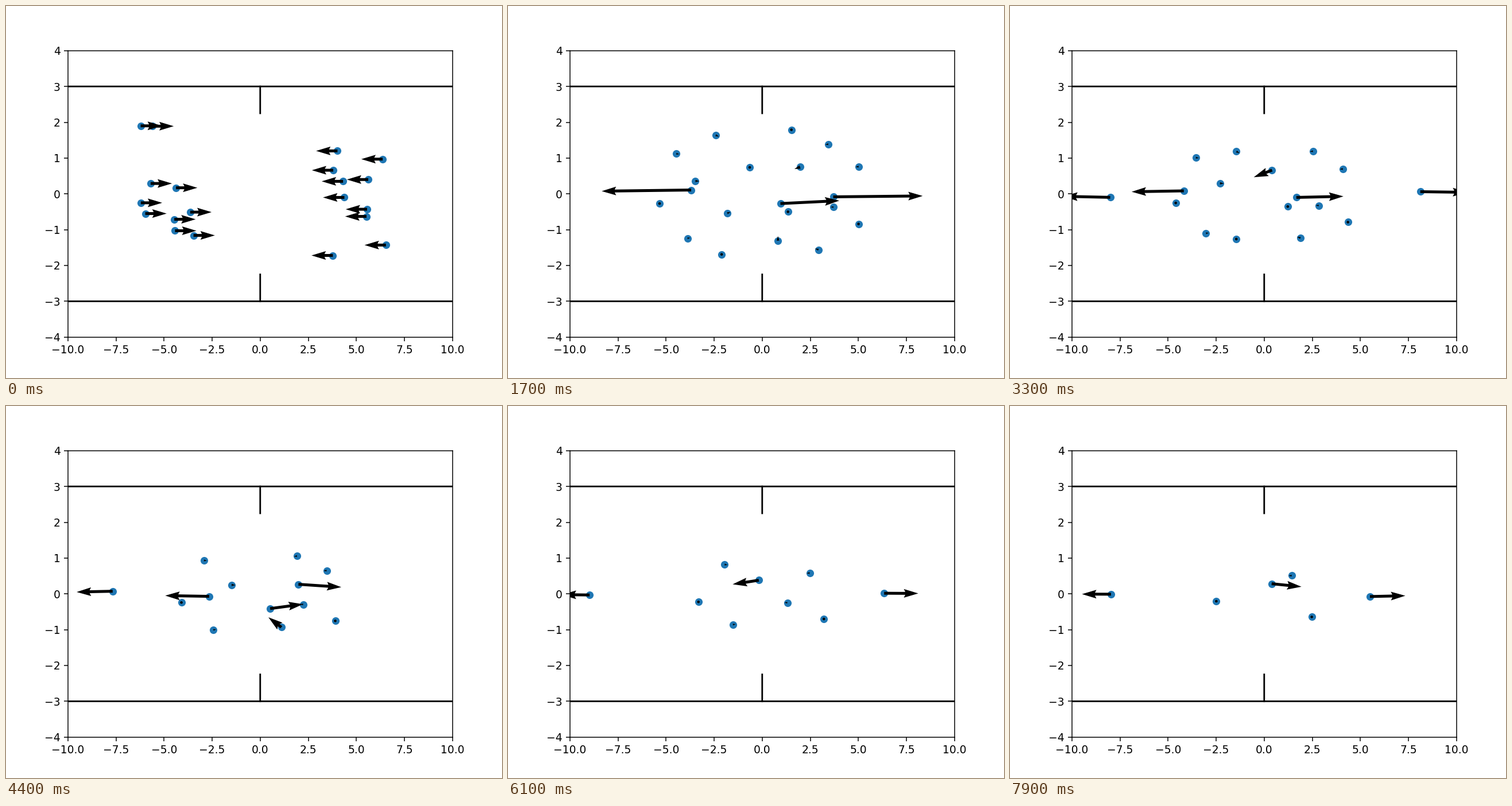
Animation of 864 by 648 pixels, one loop 8 s. Source, as a matplotlib script:

```python
import numpy as np
import matplotlib.pyplot as plt
from matplotlib.animation import FuncAnimation

FRAMES, STEP = 80, 0.1
SPEED = 4.0     # desired walking speed
BRAKE = 0.5     # time to slow down behind the crowd
QUEUE = 1.7     # time at which the queue has formed
REACH = 1.2     # distance from the door where the dash begins
GROW = 0.7      # time scale of speeding up before the door
FADE = 0.4      # time scale of the push behind the door
CENTRE = 0.5    # time scale of drifting to the middle line


def dash(t, push):
    """Distance past the door and speed, t after passing it."""
    if t < 0:
        speed = SPEED * np.exp(t / GROW)
        return GROW * (speed - SPEED), speed
    decay = np.exp(-t / FADE)
    dist = SPEED * t + push * FADE**2 * (1 - (1 + t / FADE) * decay)
    return dist, SPEED + push * t * decay


class Walker:
    """Brakes, queues, then dashes through the door at a given time."""

    def __init__(self, door, start, spot=None):
        self.side = np.array([-np.sign(start[0]), 1])
        self.door = door
        self.push = 24 + 66 * np.exp(1.4 - door)  # the crowd thins out
        self.start = self.side * start
        last = self.start if spot is None else self.side * spot
        self.gate = np.array([max(-REACH, last[0]), 0.65 * last[1]])
        self.go = door + GROW * np.log(1 + self.gate[0] / (GROW * SPEED))
        if spot is None:
            self.spot, self.settle = self.gate, self.go
        else:
            self.spot, self.settle = last, QUEUE

    def approach(self, t):
        v0 = np.array([SPEED, 0])
        way = self.spot - self.start
        cruise = (way - v0 * BRAKE / 2) / (self.settle - BRAKE / 2)
        k = min(t / BRAKE, 1)
        vel = v0 + (cruise - v0) * k
        pos = self.start + cruise * t + (v0 - cruise) * BRAKE * (k - k * k / 2)
        return pos, vel

    def queue(self, t):
        vel = (self.gate - self.spot) / (self.go - self.settle)
        return self.spot + vel * (t - self.settle), vel

    def leave(self, t):
        x, vx = dash(t - self.door, self.push)
        y = self.gate[1] * np.exp((self.go - t) / CENTRE)
        return np.array([x, y]), np.array([vx, -y / CENTRE])

    def at(self, t):
        if t <= self.settle:
            phase = self.approach
        elif t < self.go:
            phase = self.queue
        else:
            phase = self.leave
        pos, vel = phase(t)
        return self.side * pos, self.side * vel


# door time, starting point, place in the queue
walkers = [Walker(*row) for row in (
    (7.82, (-6.22, 1.90), (-4.47, 1.12)),
    (4.10, (-5.61, 1.89), (-2.42, 1.64)),
    (5.19, (-5.70, 0.29), (-3.48, 0.36)),
    (2.45, (-4.38, 0.17), (-0.65, 0.74)),
    (11.1, (-6.21, -0.25), (-5.34, -0.27)),
    (7.10, (-5.98, -0.55), (-3.89, -1.24)),
    (3.06, (-4.47, -0.71), (-1.82, -0.54)),
    (4.30, (-4.43, -1.03), (-2.11, -1.69)),
    (1.40, (-3.64, -0.51)),
    (1.58, (-3.47, -1.16)),
    (3.41, (4.02, 1.20), (1.52, 1.79)),
    (8.69, (6.37, 0.97), (5.02, 0.76)),
    (1.40, (3.80, 0.66)),
    (2.81, (4.31, 0.35), (1.98, 0.75)),
    (6.06, (5.62, 0.40), (3.44, 1.39)),
    (4.02, (4.38, -0.10), (1.34, -0.50)),
    (6.69, (5.56, -0.43), (3.71, -0.37)),
    (4.75, (5.53, -0.63), (2.93, -1.56)),
    (11.4, (6.54, -1.43), (5.01, -0.84)),
    (2.46, (3.78, -1.72), (0.82, -1.31)),
)]


def crowd(t):
    pos, vel = zip(*(w.at(t) for w in walkers))
    return np.array(pos), np.array(vel)


fig, ax = plt.subplots(figsize=(6.4, 4.8), dpi=135)
ax.set_xlim(-10, 10)
ax.set_ylim(-4, 4)
for sign in (1, -1):
    ax.plot([-10, 10], [3 * sign, 3 * sign], color="black", snap=False)
    ax.plot([0, 0], [3 * sign, 2.25 * sign], color="black", snap=False)

pos, vel = crowd(0)
dots = ax.scatter(*pos.T, color="C0")
arrows = ax.quiver(*pos.T, *vel.T, scale=18 * SPEED, width=0.0075)


def update(i):
    pos, vel = crowd(i * STEP)
    dots.set_offsets(pos)
    arrows.set_offsets(pos)
    arrows.set_UVC(*vel.T)
    return dots, arrows


anim = FuncAnimation(fig, update, frames=FRAMES, interval=1000 * STEP,
                     repeat=True, repeat_delay=0)
plt.show()
```
